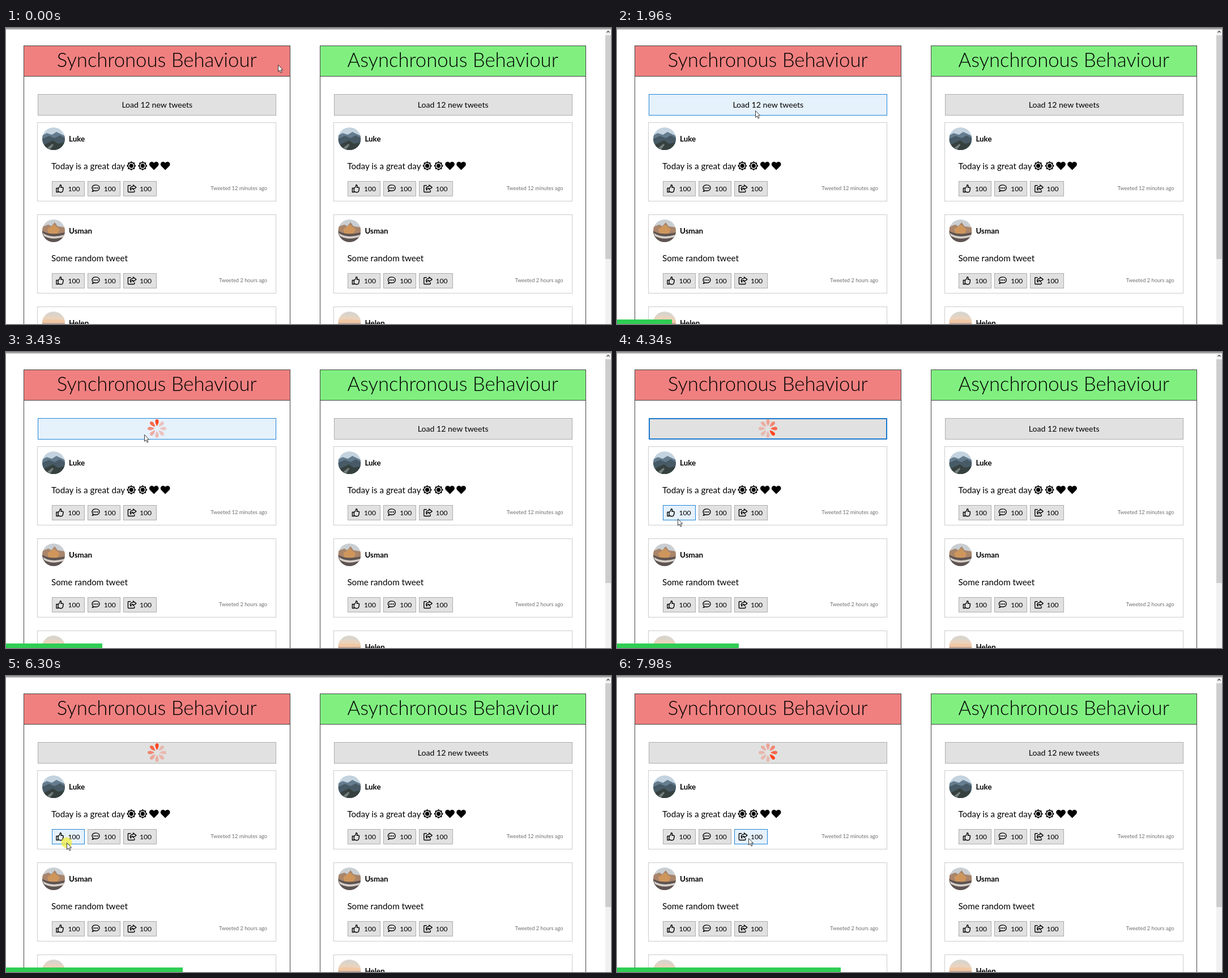
An HTML page for the animation above (8 s loop, 1068x524 px).

```html
<!DOCTYPE html>
<html lang="en">
<head>
<meta charset="utf-8">
<title>Synchronous and asynchronous loading</title>
<style>
  html, body { margin: 0; width: 100%; height: 100%; overflow: hidden; background: #fff; }
  svg { display: block; width: 1068px; height: 524px; }
  text { font-family: Lato, "Open Sans", sans-serif; fill: #000; }
  .title { font-size: 34.7px; font-weight: 300; text-anchor: middle; }
  .load { font-size: 14.1px; text-anchor: middle; }
  .name { font-size: 13.4px; font-weight: 700; }
  .body { font-size: 15.2px; }
  .count { font-size: 12.1px; }
  .ago { font-size: 9.25px; fill: #707070; text-anchor: end; }
  .line { fill: none; stroke: #000; stroke-width: 1.4; stroke-linejoin: round; stroke-linecap: round; }
</style>
</head>
<body>
<svg id="stage" viewBox="0 0 1068 524" xmlns="http://www.w3.org/2000/svg"></svg>
<script>
const LOOP = 8000, TICK = 70;
const stage = document.getElementById('stage');

const box = (x, y, w, h, fill, stroke, id = '') =>
  `<rect ${id && `id="${id}"`} x="${x + .5}" y="${y + .5}" width="${w}" height="${h}" fill="${fill}" stroke="${stroke}"/>`;
const label = (cls, x, y, str, id = '') =>
  `<text ${id && `id="${id}"`} class="${cls}" x="${x}" y="${y}">${str}</text>`;
const at = (x, y, inner) => `<g transform="translate(${x} ${y})">${inner}</g>`;

// Icons
const thumb = `<path class="line" d="M1 6.5h3v7H1zM4 7 7 3.6C7.5 2.5 7 1 8 .8 10 .8 10 3 9 5.3h3C13.5 5.5 13.3 7 12.7 7.5
  13.5 8.5 13 9.5 12.4 10 12.8 11 12.3 12 11.6 12.2 11.5 13.5 10.5 13.8 9 13.8 7 13.8 6 13 4 12.7"/>`;
const bubble = `<path class="line" d="M2.5 9.6C-.8 6 1 .9 7.3.9c8.6 0 8.6 10.4 0 10.4-1.2 0-2-.2-2.8-.5C3.5 11.7 2.3 12.3 1 12.4 1.9 11.5 2.4 10.6 2.5 9.6Z"/>
  <path d="M3.3 5.3h1.9v1.9H3.3zM6.4 5.3h1.9v1.9H6.4zM9.5 5.3h1.9v1.9H9.5z"/>`;
const share = `<path class="line" d="M5.5 1.8H2.2Q1 1.8 1 3v9.3q0 1.2 1.2 1.2h9q1.2 0 1.2-1.2v-1.6"/>
  <path class="line" d="M10 .9 15.4 5.1 10 9.3V6.8C7 6.8 5.9 7.6 6.1 10.2 3.4 6.5 5.7 3.4 10 3.4Z"/>`;
const rays = Array.from({ length: 16 }, (_, i) => {
  const r = i % 2 ? 6.4 : 8.3, a = i * Math.PI / 8;
  return (r * Math.sin(a)).toFixed(2) + ',' + (-r * Math.cos(a)).toFixed(2);
}).join(' ');
const sun = `<polygon points="${rays}"/><circle r="4.4" fill="none" stroke="#fff" stroke-width="1.5"/>`;
const heart = '<path d="M0 7.5-7.2.3C-10.5-3.6-6-9.5-1.2-6.3L0-5.2 1.2-6.3C6-9.5 10.5-3.6 7.2.3Z"/>';
const icons = [thumb, bubble, share];

// Soft stand-ins for the profile pictures
const avatars = [
  `<rect width="40" height="40" fill="#c3d3df"/>
   <path d="M0 14 8 10 17 13 25 8 40 15V40H0Z" fill="#657c8e"/>
   <path d="M0 20 12 15 22 19 31 14 40 19V40H0Z" fill="#475a66"/>
   <path d="M4 30 19 23 28 29 40 26V40H4Z" fill="#36413f"/>
   <path d="M9 36 18 29 20 31 14 39Z" fill="#737d7c"/>`,
  `<rect width="40" height="40" fill="#c9ced2"/>
   <path d="M0 13 11 9 16 12 22 5 27 12 40 14V30H0Z" fill="#a9856b"/>
   <path d="M9 17 21 9 31 18 27 25H11Z" fill="#cf965c"/>
   <path d="M0 20Q13 29 40 23V40H0Z" fill="#5e5451"/>
   <path d="M1 24Q16 34 39 27V30Q18 38 3 29Z" fill="#d8d0cb"/>`,
  `<rect width="40" height="40" fill="#d9d5cc"/>
   <path d="M0 9Q20 5 40 10V40H0Z" fill="#e9d3be"/>
   <path d="M0 15Q20 12 40 16V40H0Z" fill="#f1c8a5"/>
   <path d="M0 20H40V40H0Z" fill="#c6a797"/>`
];
const posts = [
  { name: 'Luke', text: 'Today is a great day', ago: 'Tweeted 12 minutes ago', deco: true },
  { name: 'Usman', text: 'Some random tweet', ago: 'Tweeted 2 hours ago' },
  { name: 'Helen', text: '', ago: '' }
];

// Chip positions: [x, width]
const columns = [
  { id: 'l', dx: 0, tx: 0, w: 470, fill: '#f08080', title: 'Synchronous Behaviour',
    chips: [[81, 57], [144, 57], [207, 58]] },
  { id: 'r', dx: 523, tx: 522.4, w: 469, fill: '#80ef80', title: 'Asynchronous Behaviour',
    chips: [[603, 57], [666, 57], [729, 59]] }
];

function card(col, post, i) {
  const y = 167 + i * 163, tx = col.tx;
  let out = box(55 + col.dx, y, 421, 139, '#fff', '#ccc');
  out += at(64 + tx, y + 9, `<g clip-path="url(#round)">${avatars[i]}</g>`);
  out += label('name', 111 + tx, y + 34, post.name);
  if (!post.text) return out;
  out += label('body', 80 + tx, y + 83, post.text);
  if (post.deco) [sun, sun, heart, heart].forEach((s, k) => out += at(221.2 + k * 20 + tx, y + 77, s));
  col.chips.forEach(([x, w], k) => {
    out += box(x, y + 104, w, 26, '#e1e1e1', '#adadad', `${col.id}${i}${k}`);
    const ix = 88 + k * 63.2 + tx;
    out += at(ix, y + 110, icons[k]) + label('count', ix + 21.6, y + 122, '100');
  });
  return out + label('ago', 461 + tx, y + 120, post.ago);
}

function column(col) {
  const dx = col.dx;
  return box(31 + dx, 31, col.w, 520, '#fff', '#444') +
    box(31 + dx, 31, col.w, 54, col.fill, '#444') +
    label('title', 266.3 + col.tx, 68.5, col.title) +
    box(56 + dx, 117, 420, 37, '#e1e1e1', '#adadad', col.id + 'load') +
    label('load', 266.8 + col.tx, 141, 'Load 12 new tweets', col.id + 'text') +
    posts.map((p, i) => card(col, p, i)).join('');
}

const petals = Array.from({ length: 8 }, (_, i) =>
  `<path class="petal" transform="rotate(${i * 45})" d="M0-4.5C-2.6-7.5-5.2-16.5 0-16.5 5.2-16.5 2.6-7.5 0-4.5Z" fill="#ff4722"/>`).join('');

stage.innerHTML = `<defs>
    <clipPath id="round"><circle cx="20" cy="20" r="20"/></clipPath>
    <linearGradient id="shade" x2="0" y2="1"><stop stop-color="#808080"/><stop offset="1" stop-color="#fff"/></linearGradient>
  </defs>
  <rect width="1068" height="524" fill="#fff"/>
  ${columns.map(column).join('')}
  <g id="spin" transform="translate(266.5 135.5)">${petals}</g>
  <rect x="1058" width="10" height="524" fill="#f1f1f1"/>
  <rect x="1058" y="13" width="10" height="396" fill="#cdcdcd"/>
  <path d="M1060.5 8 1063 5.5 1065.5 8" fill="none" stroke="#505050" stroke-width="1.5"/>
  <rect width="1068" height="4" fill="url(#shade)"/>
  <rect id="bar" y="516" height="8" fill="#2fcd53"/>
  <circle id="glow" r="9.5" fill="#f2ee2c"/>
  <path id="arrow" d="M.5.5V12.2L3.2 9.7 5.1 14.1 7 13.3 5.1 9H8.7Z" fill="#fff" stroke="#222" stroke-width=".9"/>`;

const $ = id => document.getElementById(id);
const petalEls = [...stage.querySelectorAll('.petal')];
const fade = [1, .8, .58, .4, .32, .28, .26, .26];

const moves = [
  { from: 710, to: 1680, a: [480, 65], b: [244, 146] },
  { from: 3500, to: 4200, a: [244, 146], b: [107, 295] },
  { from: 6740, to: 7080, a: [107, 295], b: [232, 287] }
];
const presses = [
  ['lload', 2170, 2310], ['l00', 4690, 4830], ['l00', 5390, 5530],
  ['l00', 6160, 6300], ['l02', 7140, 7350], ['l02', 7630, 7770]
];
const buttons = [['lload', 56, 117, 420, 37],
  ...columns[0].chips.map(([x, w], k) => ['l0' + k, x, 271, w, 26])];

function pointer(t) {
  let p = moves[0].a;
  for (const { from, to, a, b } of moves) {
    if (t < from) break;
    const u = Math.min(1, (t - from) / (to - from)), e = u * u * (3 - 2 * u);
    p = a.map((v, i) => Math.round(v + (b[i] - v) * e));
  }
  return p;
}

function paintButton([id, x, y, w, h], px, py, press, t) {
  const hover = px >= x && px <= x + w && py >= y && py <= y + h;
  const focus = press && press[0] === id;
  let fill = '#e1e1e1', stroke = '#adadad', line = 1;
  if (focus && t < press[2]) { fill = '#cce4f7'; stroke = '#005499'; }
  else if (hover) { fill = '#e5f1fb'; stroke = '#1f84d8'; }
  else if (focus) { stroke = '#1c78cc'; line = 2; }
  const inset = line / 2, el = $(id);
  const set = { x: x + inset, y: y + inset, width: w + 1 - line, height: h + 1 - line, fill, stroke, 'stroke-width': line };
  for (const k in set) el.setAttribute(k, set[k]);
}

function render(now) {
  const t = Math.floor((now % LOOP) / TICK) * TICK;
  const [px, py] = pointer(t);
  const press = presses.filter(p => p[1] <= t).pop();

  buttons.forEach(b => paintButton(b, px, py, press, t));
  $('bar').setAttribute('width', Math.round(t * .0495));
  $('arrow').setAttribute('transform', `translate(${px} ${py})`);

  const glow = press ? Math.min(1, Math.max(0, (press[2] + 140 - t) / 140)) : 0;
  $('glow').setAttribute('transform', `translate(${px} ${py})`);
  $('glow').setAttribute('opacity', .68 * glow);

  const loading = t >= presses[0][2];
  $('ltext').setAttribute('visibility', loading ? 'hidden' : 'visible');
  $('spin').setAttribute('visibility', loading ? 'visible' : 'hidden');
  const head = Math.floor(((t - 3430) / 715 + 5) * 8 + .85);
  petalEls.forEach((el, i) => el.setAttribute('opacity', fade[(head - i + 64) % 8]));
}

function frame(now) {
  render(now);
  requestAnimationFrame(frame);
}
render(0);
requestAnimationFrame(frame);
</script>
</body>
</html>
```
